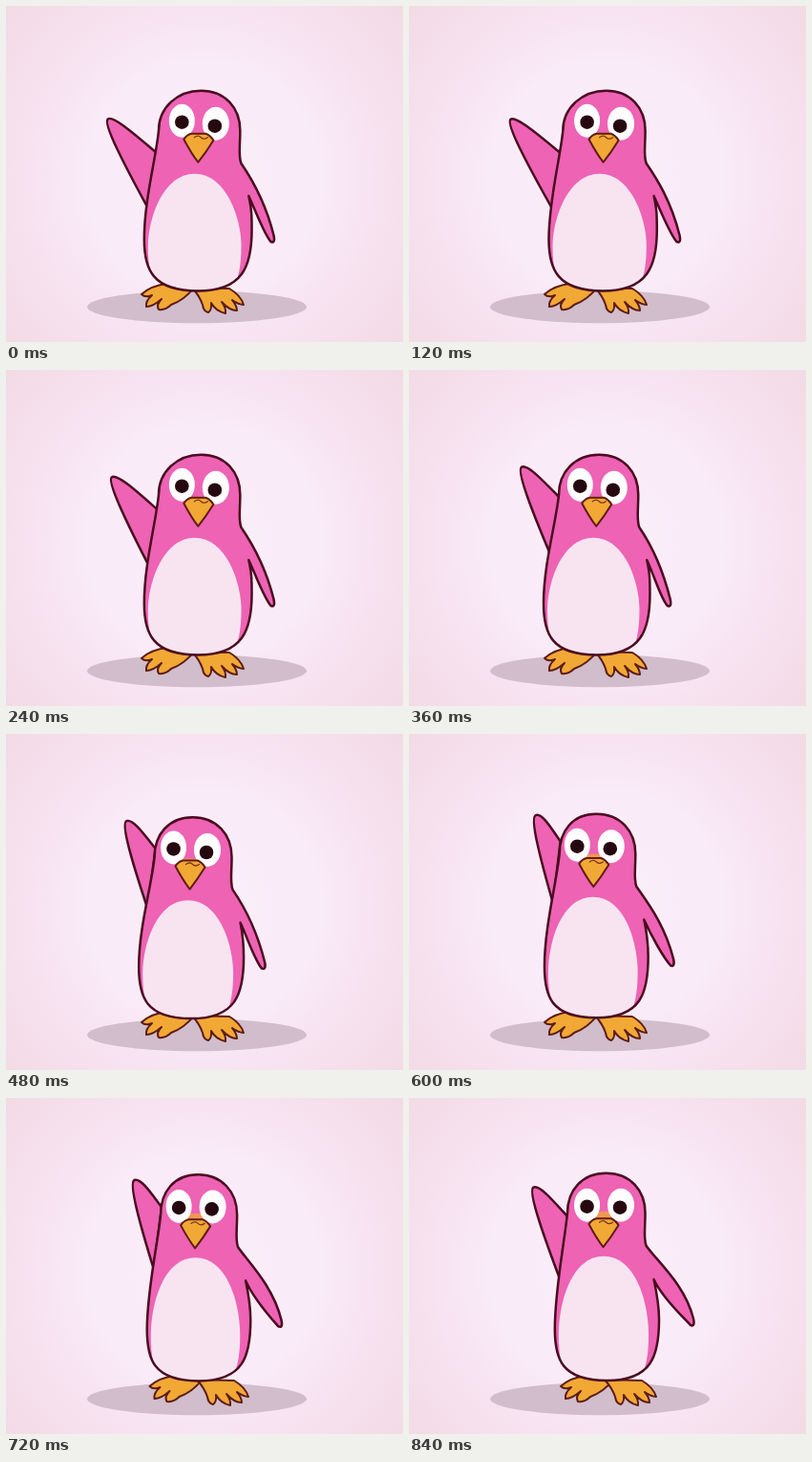
These frames come from a looping animation (416 by 352 pixels, 0.96 s). An HTML page:

```html
<!DOCTYPE html>
<html lang="en">
<head>
<meta charset="utf-8">
<title>Waving penguin</title>
<style>
  html, body { margin: 0; width: 100%; height: 100%; overflow: hidden; background: #f3deea; }
  svg { display: block; width: 100%; height: 100%; }
  .ink { stroke: #4b0b20; stroke-width: 2.5; stroke-linejoin: round; stroke-linecap: round; }
  .thin { stroke: #5e1c16; stroke-width: 2; stroke-linejoin: round; stroke-linecap: round; }
  .pink { fill: #ee63b4; }
  .orange { fill: #f1a834; }
</style>
</head>
<body>
<svg viewBox="0 0 416 352">
  <defs>
    <radialGradient id="glow" gradientUnits="userSpaceOnUse" cx="207" cy="180" r="270">
      <stop offset="0" stop-color="#faeff9"/>
      <stop offset=".45" stop-color="#f9ebf7"/>
      <stop offset=".68" stop-color="#f7e2f0"/>
      <stop offset="1" stop-color="#f2dbe5"/>
    </radialGradient>
    <clipPath id="inside"><path id="clip"/></clipPath>
  </defs>
  <rect width="416" height="352" fill="url(#glow)"/>
  <ellipse cx="200" cy="315.3" rx="115" ry="17" fill="#d1bdcb"/>
  <path id="footL" class="thin orange" d="M168 291Q152 293 142 302Q146 306 153 303Q146 309 147 315Q154 315 163 307Q157 313 160 318Q167 319 173 313Q187 308 197 295Z"/>
  <path id="footR" class="thin orange" d="M195 295Q203 304 206 313Q207 320 212 321Q216 318 215 311Q220 320 230 322Q231 317 226 310Q234 319 242 319Q242 314 237 308Q244 313 249 313Q246 303 234 296Z"/>
  <path id="wing" class="ink pink"/>
  <path id="body" class="pink"/>
  <path id="belly" fill="#f8e4f1" clip-path="url(#inside)"/>
  <path id="line" class="ink" fill="none"/>
  <path id="brow" class="orange" opacity=".75"/>
  <ellipse id="eyeL" rx="13.5" ry="17.5" fill="#fffdfd"/>
  <ellipse id="eyeR" rx="14" ry="17.5" fill="#fffdfd"/>
  <circle id="pupilL" r="7.3" fill="#260810"/>
  <circle id="pupilR" r="7.3" fill="#260810"/>
  <path id="beak" class="thin orange"/>
  <path id="nose" fill="none" stroke="#7a3518" stroke-width="1.3" stroke-linecap="round"/>
</svg>
<script>
const STEP = 120, COUNT = 8;

const $ = id => document.getElementById(id);
const set = (id, attrs) => {
  for (const k in attrs) $(id).setAttribute(k, attrs[k]);
};
const smooth = (a, b, x) => {
  const t = Math.min(1, Math.max(0, (x - a) / (b - a)));
  return t * t * (3 - 2 * t);
};
const swing = (k, peak, period) => Math.cos(2 * Math.PI * (k - peak) / period);

function wingPath(tx, ty, ix, iy, lx, ly) {
  const dx = (ix + lx) / 2 - tx, dy = (iy + ly) / 2 - ty, len = Math.hypot(dx, dy);
  const u = dx / len, v = dy / len;
  // point offset across the wing, to either side of its axis
  const off = (x, y, n) => `${x + v * n} ${y - u * n}`;
  const mid = (x, y, n) => off((tx + x) / 2, (ty + y) / 2, n);
  return `M${ix} ${iy}C${mid(ix, iy, 3)} ${off(tx, ty, 7)} ${tx} ${ty}` +
    `C${off(tx, ty, -7)} ${mid(lx, ly, -4)} ${lx} ${ly}Z`;
}

function bodyPath(hx, hy, hl, l, r, b, wx, wy) {
  const R = hx + 41, mid = (l + r) / 2, px = hx + 50, py = wy - 49;
  return `M${hx} ${hy}C${hx + 25} ${hy} ${R} ${hy + 18} ${R} ${hy + 42}` +
    `C${R} ${hy + 60} ${R - 2} ${hy + 68} ${R + 1} ${hy + 76}` +
    `C${R + 12} ${hy + 92} ${wx - 8} ${wy - 44} ${wx + 1} ${wy - 8}` +
    `Q${wx + 3} ${wy + 1} ${wx - 2} ${wy - 1}` +
    `C${wx - 9} ${wy - 9} ${px + 9} ${py + 20} ${px} ${py}` +
    `C${px + 3} ${py + 14} ${r} ${b - 80} ${r} ${b - 64}` +
    `C${r} ${b - 26} ${mid + 47} ${b} ${mid} ${b}` +
    `C${mid - 48} ${b} ${l} ${b - 23} ${l} ${b - 54}` +
    `C${l} ${b - 95} ${hl - 3} ${hy + 72} ${hl} ${hy + 42}` +
    `C${hl} ${hy + 18} ${hx - 25} ${hy} ${hx} ${hy}Z`;
}

function bellyPath(l, r, top, b) {
  const x = (l + r) / 2;
  return `M${x} ${top}C${x + 33} ${top} ${r} ${top + 47} ${r} ${b - 47}Q${r} ${b - 15} ${r - 10} ${b}` +
    `H${l + 10}Q${l} ${b - 15} ${l} ${b - 47}C${l} ${top + 47} ${x - 33} ${top} ${x} ${top}Z`;
}

function draw(k) {
  // four motions drive the whole pose
  const sway = swing(k, 1, 7);
  const rise = smooth(3, 7, k);
  const wave = (1 + swing(k, 5.3, 9.5)) / 2;
  const shuffle = smooth(5, 7, k);
  const mix = (base, s, r) => base + s * sway + r * rise;

  const hx = mix(200.6, 6, 2.2), hy = 88.7 - 10 * rise;
  const hl = mix(157.8, 3.5, 6), l = mix(142, 4.5, 8), r = mix(253.8, 6, 4.5);
  const b = 298.5 - 2.5 * rise;

  const d = bodyPath(hx, hy, hl, l, r, b, mix(274.5, 8, 17.5), 248 - 9 * rise);
  for (const id of ['body', 'clip', 'line']) set(id, { d });
  set('belly', { d: bellyPath(l + 4, r - 11, hy + 87, b) });

  const joint = 214 - 37 * wave;
  set('wing', {
    d: wingPath(106 + 23 * wave + 8 * rise, 119.5 - 34 * wave - 1.5 * rise,
      hl + 1, 158 - 46 * wave, hl - 0.13 * (joint - hy - 42), joint)
  });

  const ax = hx - 20, ay = hy + 33 + 2 * rise, cx = hx + 14.5, cy = hy + 37 - rise;
  set('eyeL', { cx: ax, cy: ay - 1.5 });
  set('eyeR', { cx: cx + 1, cy: cy - 2.5 });
  set('pupilL', { cx: ax, cy: ay });
  set('pupilR', { cx, cy });

  const nx = hx - 4, ny = hy + 75 + 2.5 * rise;
  set('brow', { d: `M${nx - 6} ${hy + 44 - 4 * rise}h14L${nx + 16} ${ny - 24}H${nx - 14}Z` });
  set('beak', {
    d: `M${nx - 14} ${ny - 24}Q${nx - 11} ${ny - 29} ${nx - 6} ${ny - 30}H${nx + 9}` +
       `Q${nx + 14} ${ny - 28} ${nx + 17} ${ny - 23}Q${nx + 9} ${ny - 10} ${nx + 1} ${ny}` +
       `Q${nx - 6} ${ny - 9} ${nx - 14} ${ny - 24}Z`
  });
  set('nose', { d: `M${nx - 3} ${ny - 26}q4 -3 7 0t7 0` });

  set('footL', { transform: `translate(${17 * shuffle})` });
  set('footR', { transform: `translate(${10 * shuffle})` });
}

const start = performance.now();
function tick() {
  draw(Math.floor((performance.now() - start) / STEP) % COUNT);
  requestAnimationFrame(tick);
}
tick();
</script>
</body>
</html>
```
